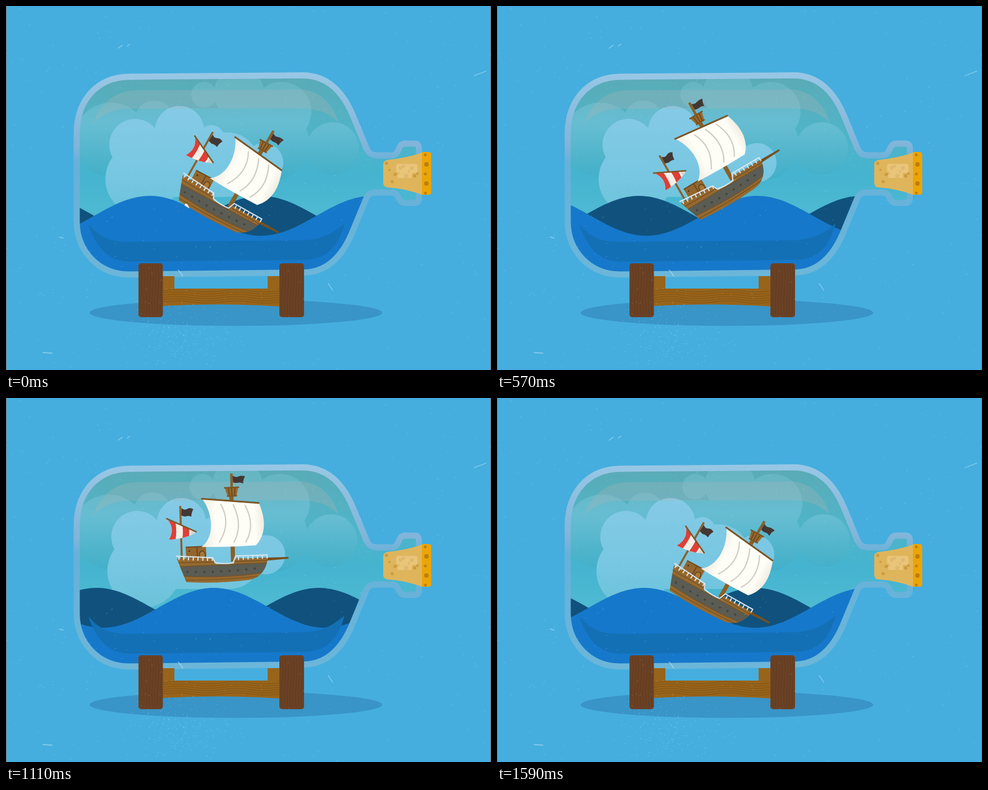
Write an HTML page that moves like this. It is 864x648 px and loops after 1.62 s.

```html
<!DOCTYPE html>
<html lang="en">
<head>
<meta charset="utf-8">
<title>Ship in a bottle</title>
<style>
html, body { margin: 0; width: 100%; height: 100%; overflow: hidden; background: #45aedf; }
svg { display: block; width: 100vw; height: 100vh; }
</style>
</head>
<body>
<svg viewBox="0 0 864 648" xmlns="http://www.w3.org/2000/svg">
<defs>
  <linearGradient id="sky" gradientUnits="userSpaceOnUse" x1="0" y1="125" x2="0" y2="380">
    <stop offset="0" stop-color="#5aabb6"/><stop offset=".35" stop-color="#51b3c6"/>
    <stop offset=".7" stop-color="#45b4d0"/><stop offset="1" stop-color="#50bad2"/>
  </linearGradient>
  <linearGradient id="far" gradientUnits="userSpaceOnUse" x1="0" y1="130" x2="0" y2="310">
    <stop offset="0" stop-color="#66b5c1"/><stop offset=".45" stop-color="#66bdd2"/>
    <stop offset=".75" stop-color="#51b5cb"/><stop offset="1" stop-color="#41afca"/>
  </linearGradient>
  <linearGradient id="near" gradientUnits="userSpaceOnUse" x1="0" y1="180" x2="0" y2="370">
    <stop offset="0" stop-color="#85cae6"/><stop offset=".6" stop-color="#78c7e2"/>
    <stop offset="1" stop-color="#6cc3da"/>
  </linearGradient>
  <linearGradient id="glass" gradientUnits="userSpaceOnUse" x1="0" y1="120" x2="0" y2="480">
    <stop offset="0" stop-color="#98c7e5"/><stop offset=".36" stop-color="#80b5da"/>
    <stop offset=".44" stop-color="#66b1d9"/><stop offset="1" stop-color="#6bb6d9"/>
  </linearGradient>
  <linearGradient id="cloth">
    <stop offset="0" stop-color="#ece9dc"/><stop offset=".25" stop-color="#fefdf6"/>
    <stop offset=".85" stop-color="#fefdf6"/><stop offset="1" stop-color="#f0ede0"/>
  </linearGradient>
  <path id="bottle" d="M735.500 263V253Q735.500 245 728 245H711C697 245 702 266 687 266H664C652 266 646 263 642 253L618 195C602 157 576 123.500 528 123.500L218 126C165 127 126 165 126 228V385C127 436 164 477 218 478L530 474.500C576 474 602 440 618 400L642 342C646 334 650 332 660 332H687C702 332 697 350.500 711 350.500H728Q735.500 350.500 735.500 342V333"/>
  <clipPath id="inside"><use href="#bottle"/></clipPath>
  <clipPath id="hull"><path d="M304 288L370 292L373 302H405L410 293L466 296C462 318 449 331 430 333Q372 337 319 331Z"/></clipPath>
  <clipPath id="lateen"><path d="M292 219L342 243Q322 254 292 254Q304 236 292 219Z"/></clipPath>
</defs>

<rect width="864" height="648" fill="#45aedf"/>
<path d="M.5 0V648M863.500 0V648" stroke="#75767a"/>
<ellipse cx="409.500" cy="546" rx="260.500" ry="23.500" fill="#3994c7"/>

<g clip-path="url(#inside)">
  <rect x="120" y="115" width="640" height="370" fill="url(#sky)"/>
  <g id="farClouds" fill="url(#far)">
    <circle cx="187" cy="238" r="66"/><circle cx="264" cy="202" r="34"/>
    <circle cx="353" cy="158" r="23"/><circle cx="415" cy="155" r="45"/>
    <circle cx="491" cy="188" r="53"/><circle cx="582" cy="254" r="47"/>
    <rect x="270" y="182" width="270" height="128" rx="62"/>
  </g>
  <g id="nearClouds" fill="url(#near)">
    <circle cx="230" cy="247" r="46"/><circle cx="309" cy="222" r="44"/>
    <circle cx="366" cy="235" r="23"/><circle cx="459" cy="279" r="35"/>
    <circle cx="242" cy="308" r="65"/><rect x="220" y="225" width="230" height="115" rx="55"/>
  </g>
  <path d="M154 213C165 178 190 150 235 150L525 148.500C562 151 584 178 593 208C580 193 560 183 525 182L218 183C186 184 166 195 154 213Z" fill="#a9b4b4" opacity=".3"/>
  <path id="back" fill="#10527d"/>
  <path id="front" fill="#1678ca"/>
  <path d="M147 389C165 410 184 420 216 420L530 417C562 416 584 404 603 387C592 430 571 451 530 452L215 455C180 453 158 425 147 389Z" fill="#1370b5"/>
</g>

<g id="ship">
  <path d="M315 195L313 292" stroke="#8b6028" stroke-width="3.500"/>
  <path d="M317 199Q322 204 327 201T338 202Q334 208 334 215Q328 213 325 214T316 212Z" fill="#433734"/>
  <path d="M409 142L407.500 190" stroke="#8b6028" stroke-width="4.500"/>
  <path d="M407 180L404 299" stroke="#8b6028" stroke-width="7.500"/>
  <path d="M411 146Q416 150 421 148T433 148Q429 154 429 161Q424 158 420 159T411 158Z" fill="#433734"/>
  <path d="M396 167H420L416 182H400Z" fill="#96682d"/>
  <path d="M402 168L403.500 181M408 168V181M414 168L412.500 181" stroke="#664419" stroke-width="1.600"/>
  <path d="M394.500 167H421.500M399 182H417" stroke="#7b5524" stroke-width="2.500"/>
  <g clip-path="url(#lateen)">
    <rect x="285" y="210" width="60" height="50" fill="#f3efe7"/>
    <path d="M286 210H303Q309 236 302 262H286ZM316 220H327Q332 240 325 262H314Q320 240 316 220Z" fill="#df3f36"/>
    <path d="M330 220Q336 240 328 262H350V220Z" fill="#d9d4cb"/>
  </g>
  <path d="M289 216L342 243" stroke="#7b5524" stroke-width="2.600"/>
  <rect x="321" y="269" width="36" height="23" fill="#93662e"/>
  <path d="M321 269H357M341 269V290" stroke="#6c481e" stroke-width="2"/>
  <path d="M345 291V281Q350 273 355 281V291" fill="#a77738" stroke="#5f3f1a" stroke-width="1.500"/>
  <path d="M327 276h7" stroke="#4c341a" stroke-width="3" stroke-linecap="round" stroke-dasharray="0 7"/>
  <path d="M355 185L455 196C466 225 466 253 446 272Q400 273 349 270C374 254 373 212 355 185Z" fill="url(#cloth)"/>
  <path d="M387 195Q405 230 381 264M409 197Q426 235 407 265M430 199Q448 236 428 266" fill="none" stroke="#cfccc1" stroke-width="2.200"/>
  <path d="M353 184L456 197" stroke="#7b5524" stroke-width="3"/>
  <path d="M440 294L503 295.500V298.500L440 301Z" fill="#76501f"/>
  <g clip-path="url(#hull)" fill="none">
    <rect x="300" y="284" width="170" height="54" fill="#96692f"/>
    <path d="M304 296L470 300M310 327Q380 331 450 327" stroke="#76501f" stroke-width="1.400"/>
    <path d="M300 303L470 304V319Q400 330 300 319Z" fill="#5b5c53" stroke="#74532a" stroke-width="1.500"/>
    <path d="M322 313Q390 318 455 312" stroke="#42453f" stroke-width="4" stroke-linecap="round" stroke-dasharray="0 15"/>
  </g>
  <g fill="none" stroke="#dce7ed">
    <path d="M303 284L368 290L372 299Q388 303 404 301L409 289L466 290" stroke-width="2"/>
    <path d="M307 288L368 293M413 293.500H466" stroke-width="6" stroke-dasharray="2 6.500"/>
  </g>
</g>
<g id="spray" fill="#eeeef2"></g>

<use href="#bottle" fill="none" stroke="url(#glass)" stroke-width="10.800" stroke-linejoin="round"/>

<path d="M680 274Q712 271 741 261V336Q712 325 680 323Q672 322 672 315V282Q672 275 680 274Z" fill="#dfb55c"/>
<g id="pores" fill="#cd9d42"></g>
<path d="M741 260H753Q757.500 260 757.500 265V331Q757.500 336 753 336H741Z" fill="#eca506"/>
<g id="capPores" fill="#bd7f08"></g>
<path d="M699 281H729Q733 281 733 285V293Q733 297 729 297H723V306H697V297Q695 297 695 293V285Q695 281 699 281Z" fill="#f4d698" opacity=".5"/>

<path d="M278 481H300V503H466V481H488V535Q384 528 278 534Z" fill="#98641a"/>
<rect x="236" y="458" width="43.500" height="96" rx="5" fill="#6a4125"/>
<rect x="487" y="458" width="44" height="96" rx="5" fill="#6a4125"/>
<g id="grain" fill="none" stroke="#4e300f" stroke-width=".8" opacity=".4"></g>
<path id="dust" fill="none" stroke="#d5eefa" stroke-linecap="round" opacity=".32"/>
<path d="M834 124L855 116M200 75L207 70M216 71L221 68M66 617L82 618M95 411L102 413M307 470L315 481M574 494L582 506" stroke="#c8e9f8" stroke-width="1.300" stroke-linecap="round" opacity=".6"/>
</svg>
<script>
const LOOP = 1620, WAVE = 396, TAU = 2 * Math.PI;
const $ = id => document.getElementById(id);

function add(parent, tag, attrs) {
  const el = document.createElementNS('http://www.w3.org/2000/svg', tag);
  for (const k in attrs) el.setAttribute(k, attrs[k]);
  $(parent).appendChild(el);
  return el;
}
const move = (id, x) => $(id).setAttribute('transform', `translate(${x})`);

let seed = 11;
const rnd = () => (seed = seed * 16807 % 2147483647) / 2147483647;

// cork
for (let i = 0; i < 12; i++)
  add('pores', 'circle', { cx: 678 + i * 5, cy: 280 + rnd() * 38, r: 2 + rnd() * 2.2 });
for (let i = 0; i < 5; i++)
  add('capPores', 'circle', { cx: 747 + i % 2 * 2, cy: 265 + i * 17, r: 2.5 + i % 2 * 1.5 });

// wood grain
for (let y = 507; y < 531; y += 4) add('grain', 'path', { d: `M280 ${y}q26 -4 52 0t52 0t52 0t50 0` });
for (let x = 241; x < 278; x += 5)
  add('grain', 'path', { d: `M${x} 461q3 22 0 45t0 45M${x + 251} 461q3 22 0 45t0 45` });

// dust: even scatter, with every third speck gathered low on the left
let specks = '';
for (let i = 0; i < 620; i++) {
  const near = i % 3 === 0;
  const x = near ? 310 + (rnd() + rnd() - 1) * 110 : rnd() * 864;
  const y = near ? 585 + (rnd() + rnd() - 1) * 65 : rnd() * 648;
  specks += `M${x.toFixed(1)} ${y.toFixed(1)}l${(rnd() * 1.2).toFixed(1)} ${(rnd() - .5).toFixed(1)}`;
}
$('dust').setAttribute('d', specks);

// Share of the wave cycle done: steady, nearly held while the ship hangs, then quick.
const pace = [[0, 0], [570, .475], [810, .66], [1350, .753], [1590, .985], [LOOP, 1]];
function progress(t) {
  const i = pace.findIndex(([end]) => end > t);
  const [a, p] = pace[i - 1], [b, q] = pace[i];
  return p + (q - p) * (t - a) / (b - a);
}

// Smooth closed curve through evenly spaced values.
function around(vals, p) {
  const n = vals.length, i = Math.floor(p * n), u = p * n - i;
  const [a, b, c, d] = [-1, 0, 1, 2].map(k => vals[(i + k + n) % n]);
  return b + u / 2 * (c - a + u * (2 * a - 5 * b + 4 * c - d + u * (3 * (b - c) + d - a)));
}
const shipX = [375.7, 386, 400.5, 408.3, 389, 381.5];
const shipY = [358.8, 388, 365, 323, 300.7, 324];
const shipTilt = [28.3, -3.5, -22.5, -30.5, -7.2, 7];

function wave(crest) {
  let d = 'M120 490';
  for (let x = 120; x <= 680; x += 5)
    d += `L${x} ${(373.5 - 35.5 * Math.cos((x - crest) / WAVE * TAU)).toFixed(2)}`;
  return d + 'V490Z';
}

const drops = Array.from({ length: 4 }, () =>
  add('spray', 'path', { d: 'M-12 -2C-11 -9 -2 -7 3 -2L12 5Q-2 5 -10 3Q-13 2 -12 -2Z' }));

// Drops leave the stern at a steady beat and trail off to the left.
function splash(t) {
  drops.forEach((el, k) => {
    const birth = 110 * k - 10, age = t - birth;
    const x = 325 + 13 * k - .18 * age;
    const y = 402 - 48 * .25 ** k + .2 * .5 ** k * age;
    const life = Math.min(350, 530 - birth);
    const size = Math.max(0, Math.min(1, (age + 15) / 55, (life - age) / 120));
    const flat = 1 - .45 * Math.min(1, Math.max(0, t - 150) / 240);
    el.setAttribute('transform',
      `translate(${x} ${y}) rotate(${25 * .6 ** k}) scale(${size} ${size * flat})`);
  });
}

function draw(t) {
  const p = progress(t), swing = Math.cos(t / LOOP * TAU);
  const crest = 652 - WAVE * p;
  move('nearClouds', 2.5 - 2.5 * swing);
  move('farClouds', 2.1 * swing - 2.1);
  $('front').setAttribute('d', wave(crest));
  $('back').setAttribute('d', wave(crest - 206 + 8 * swing));
  $('ship').setAttribute('transform', `translate(${around(shipX, p)} ${around(shipY, p)})` +
    `rotate(${around(shipTilt, p)}) translate(-385 -310)`);
  splash(t);
}

const start = performance.now();
function tick() {
  const t = (performance.now() - start) % LOOP;
  draw(Math.floor(t / 30) * 30);
  requestAnimationFrame(tick);
}
draw(0);
requestAnimationFrame(tick);
</script>
</body>
</html>
```
